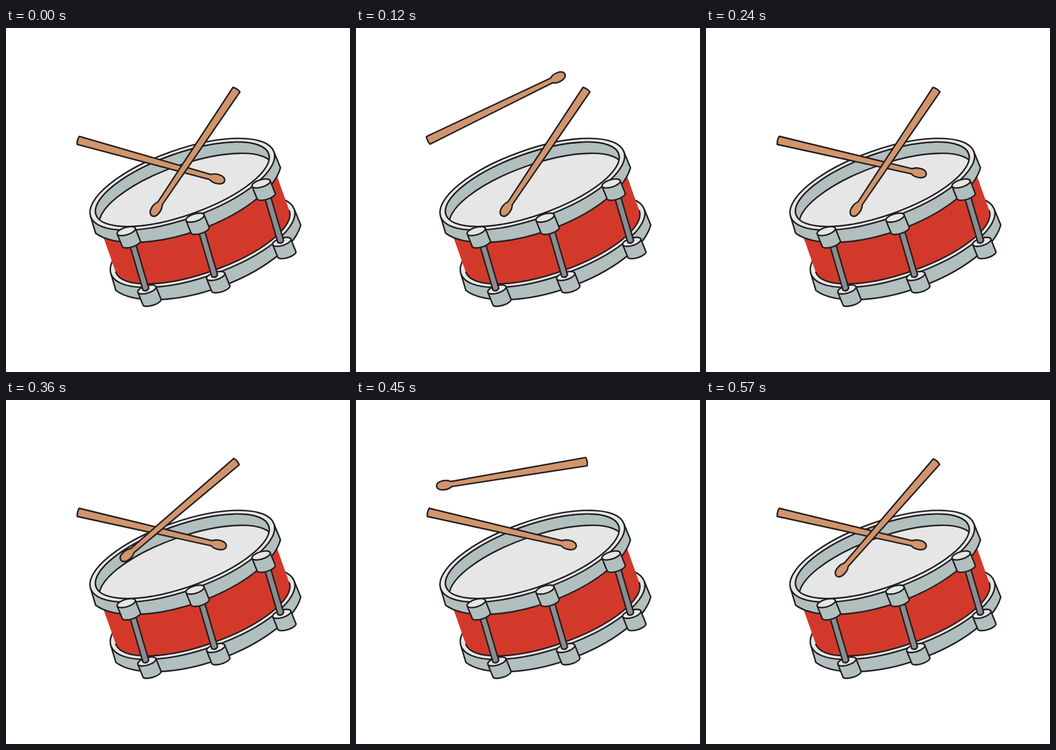
These frames come from a looping animation (600 px wide and 600 px high, 600 ms). An HTML page:

```html
<!DOCTYPE html>
<html lang="en">
<head>
<meta charset="utf-8">
<title>Drum</title>
<style>
  html, body { margin: 0; height: 100%; overflow: hidden; background: #fff; }
  svg { display: block; width: 100%; height: 100%; }
  .steel { fill: #b1bfbe; }
  .pale { fill: #e6e6e6; }
  .wood { fill: #d1956c; }
  .red { fill: #d3392b; stroke: none; }
  .line { fill: none; }
</style>
</head>
<body>
<svg viewBox="0 0 600 600" stroke="#231f20" stroke-width="2.6" stroke-linejoin="round" stroke-linecap="round">
  <defs>
    <clipPath id="opening"><ellipse rx="159.8" ry="54"/></clipPath>
    <g id="hoop">
      <path class="steel" d="M-169.5 0L-171 30A178 76 0 0 0 171 30L169.5 0"/>
      <ellipse class="pale" rx="169.5" ry="60"/>
    </g>
    <g id="lug">
      <path class="steel" d="M-16.5 0L-15.5 23.5A16.5 6 2.5 0 0 17.5 23.5L16.5 0"/>
      <ellipse class="pale" rx="16.5" ry="6.5" transform="rotate(2.5)"/>
    </g>
    <g id="post">
      <use href="#lug" y="108"/>
      <path fill="#8a8c8f" d="M-2 20L-6.8 107Q-1.5 112 3.8 107L8.5 20Z"/>
      <use href="#lug"/>
    </g>
    <path id="stick" class="wood" d="M0-7.3L239-4.5C246-9.5 264-10 265 0C264 10 246 9.5 239 4.5L0 7.3Q-2.5 0 0-7.3Z"/>
  </defs>

  <g transform="translate(307.5 272.5) rotate(-19.5)">
    <use href="#hoop" y="106"/>
    <path class="red" d="M-160.5 20V106A160.5 54 0 0 0 160.5 106V20Z"/>
    <path class="line" d="M-160.5 106A160.5 54 0 0 0 160.5 106"/>
    <use href="#hoop"/>
    <g clip-path="url(#opening)">
      <ellipse class="steel" rx="159.8" ry="54"/>
      <ellipse class="pale" cy="21" rx="159.8" ry="54"/>
    </g>
    <ellipse class="line" rx="159.8" ry="54"/>
    <use href="#post" x="-119.5" y="44.4"/>
    <use href="#post" x="1.5" y="62.3"/>
    <use href="#post" x="130" y="44.6"/>
  </g>

  <use id="left" href="#stick"/>
  <use id="right" href="#stick"/>
</svg>
<script>
  const LOOP = 600, STEP = 30, RIGHT_START = 330;
  const left = document.getElementById('left');
  const right = document.getElementById('right');

  // Lift from 0 (on the skin) to 1 (top): swing up, drop, then rest at the rebound height.
  function lift(time, rebound) {
    const n = Math.floor(time / STEP);
    if (n <= 0) return 0;
    if (n < 4) return Math.sin(n * 0.34);
    if (n < 8) return 1 - 0.925 * ((n - 4) / 3) ** 1.4;
    return rebound;
  }

  function pose(stick, x, y, angle) {
    stick.setAttribute('transform', `translate(${x} ${y}) rotate(${angle})`);
  }

  function draw(now) {
    const time = now % LOOP;
    pose(left, 126, 196, 15.5 - 41.4 * lift(time, 0.06));
    pose(right, 402, 107.5, 123.9 + 46.7 * lift(time - RIGHT_START, 0.156));
    requestAnimationFrame(draw);
  }

  draw(0);
</script>
</body>
</html>
```
